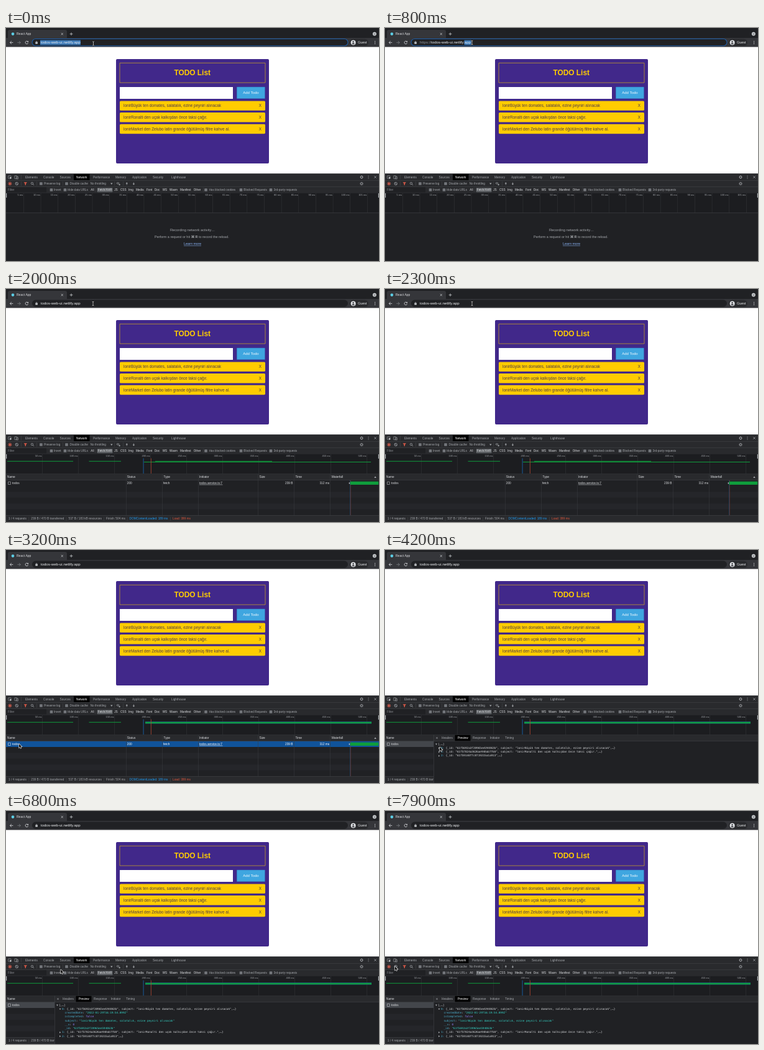
Recreate the animation shown at these times as an HTML page with a canvas. Size 600x375 px, loop 8 s.

```html
<!DOCTYPE html>
<html lang="en">
<head>
<meta charset="utf-8">
<title>Todo app with network panel</title>
<style>
  html, body { margin: 0; width: 100%; height: 100%; overflow: hidden; background: #fff; }
  canvas { display: block; width: 100vw; height: 100vh; }
</style>
</head>
<body>
<canvas id="stage"></canvas>
<script>
const LOOP = 8000, STEP = 100;
const WHOLE_URL = 200, WORD = 600, LOADED = 1700, HOVER = 2900, SELECTED = 3100, PANEL = 3400, EXPANDED = 4700;
const SANS = '"Liberation Sans", Arial, sans-serif';
const MONO = '"DejaVu Sans Mono", monospace';
const GREY = '#a5a8ac', LIGHT = '#dcdee1', BAR = '#292a2d', DARK = '#202124', LINE = '#46484c', GREEN = '#0f9d3c';

const todos = [
  'lonirBüyük ten domates, salatalık, ezine peyniri alınacak',
  'lonirRonalti den uçak kalkışdan önce taksi çağır.',
  'lonirMarket den Zelubo latin grande öğütülmüş filtre kahve al.'
];
const pointerPath = [
  [0, 140.5, 25], [500, 140, 23.5], [2500, 140, 23.5], [3000, 21, 312], [3500, 21, 312],
  [4200, 88, 317], [4700, 88, 317], [5200, 108, 331], [6100, 108, 331],
  [6700, 88, 255], [7000, 88, 255], [7600, 16, 250], [8000, 16, 250]
];

const canvas = document.getElementById('stage');
const c = canvas.getContext('2d');

function rect(x, y, w, h, color, radius = 0) {
  c.fillStyle = color;
  c.beginPath();
  c.roundRect(x, y, w, h, radius);
  c.fill();
}

function frame(x, y, w, h, color, width = 0.6, radius = 0) {
  c.strokeStyle = color;
  c.lineWidth = width;
  c.beginPath();
  c.roundRect(x, y, w, h, radius);
  c.stroke();
}

function path(color, width, ...points) {
  c.strokeStyle = color;
  c.lineWidth = width;
  c.beginPath();
  points.forEach(([x, y]) => c.lineTo(x, y));
  c.stroke();
}

function shape(color, ...points) {
  c.fillStyle = color;
  c.beginPath();
  points.forEach(([x, y]) => c.lineTo(x, y));
  c.fill();
}

function arc(x, y, r, color, width = 0, from = 0, to = Math.PI * 2) {
  c.beginPath();
  c.arc(x, y, r, from, to);
  c.fillStyle = c.strokeStyle = color;
  c.lineWidth = width;
  width ? c.stroke() : c.fill();
}

function text(s, x, y, size = 4.7, color = GREY, { align = 'left', weight = 400, family = SANS } = {}) {
  c.font = `${weight} ${size}px ${family}`;
  c.textAlign = align;
  c.textBaseline = 'middle';
  c.fillStyle = color;
  c.fillText(s, x, y);
  return x + c.measureText(s).width;
}

const hLine = (y, x1 = 0, x2 = 600, color = LINE) => rect(x1, y, x2 - x1, 0.5, color);
const vLine = (x, y1, y2, color = LINE) => rect(x, y1, 0.5, y2 - y1, color);
const cross = (x, y, r, color) => {
  path(color, 0.7, [x - r, y - r], [x + r, y + r]);
  path(color, 0.7, [x - r, y + r], [x + r, y - r]);
};
const dots = (x, y, color) => [-2, 0, 2].forEach(d => arc(x, y + d, 0.55, color));
const checkbox = (x, y) => rect(x - 2.3, y - 2.3, 4.6, 4.6, '#74777c', 0.6);
const gear = (x, y) => {
  arc(x, y, 1.7, GREY, 0.9);
  for (let a = 0; a < 8; a++) {
    const u = Math.cos(a * Math.PI / 4), v = Math.sin(a * Math.PI / 4);
    path(GREY, 0.7, [x + u * 2, y + v * 2], [x + u * 2.8, y + v * 2.8]);
  }
};

function drawAddress(t) {
  const y = 23.4, size = 6.1;
  rect(42, 17.5, 508, 11.2, DARK, 5.6);
  if (t < LOADED) frame(42, 17.5, 508, 11.2, '#1d5da8', 1.1, 5.6);
  rect(47.3, 22.6, 3.6, 3, '#c4c7ca', 0.4);
  arc(49.1, 22.4, 1.1, '#c4c7ca', 0.6, Math.PI, 0);

  const host = 'todos-web-ui.netlify.', end = 'app';
  if (t < WHOLE_URL) rect(55, 19.6, 65, 7.6, '#3b79b8');
  let x = 55.8;
  if (t >= WHOLE_URL && t < LOADED) x = text('https://', x, y, size, '#8d9195');
  x = text(host, x, y, size, '#eceef0');
  if (t >= WORD && t < LOADED) rect(x - 0.3, 19.6, 11.3, 7.6, '#3b79b8');
  text(end, x, y, size, '#eceef0');
}

function drawBrowser(t) {
  rect(0, 0, 600, 31, DARK);
  rect(3, 3, 95, 16, '#35363a', 3);
  rect(0, 16, 600, 14.6, '#35363a');
  arc(11, 9.6, 2.3, '#5ccfe6');
  text('React App', 17, 9.8, 5, LIGHT);
  cross(90.3, 9.6, 1.6, LIGHT);
  path(LIGHT, 0.7, [102.6, 9.6], [107.4, 9.6]);
  path(LIGHT, 0.7, [105, 7.2], [105, 12]);
  arc(592.8, 9.5, 3, '#c4c7ca');
  path(DARK, 0.7, [591.5, 9], [592.8, 10.3], [594.1, 9]);

  path(LIGHT, 0.8, [8.8, 21], [6.4, 23.4], [8.8, 25.8]);
  path(LIGHT, 0.8, [6.4, 23.4], [11.4, 23.4]);
  path('#7c7f83', 0.8, [21, 21], [23.4, 23.4], [21, 25.8]);
  path('#7c7f83', 0.8, [18.4, 23.4], [23.4, 23.4]);
  arc(33.4, 23.4, 2.3, LIGHT, 0.8, 0.3, 5.4);
  shape(LIGHT, [33.8, 22.8], [36, 22.8], [36, 20.4]);
  drawAddress(t);

  rect(553, 17.8, 30, 11, '#292a2d', 5.5);
  arc(558.6, 23.4, 4, '#e0e2e5');
  arc(558.6, 22.3, 1.3, '#44464a');
  arc(558.6, 26.3, 2.2, '#44464a', 0, Math.PI, 0);
  text('Guest', 566, 23.6, 5.4, '#eceef0');
  dots(593.6, 23.4, LIGHT);
}

function drawApp() {
  rect(0, 30.6, 600, 204, '#fff');
  rect(177, 50, 246, 168, '#41288a', 2);
  frame(183, 56.3, 234, 31.7, '#c09a2c', 0.8);
  text('TODO List', 299.7, 72.6, 11.9, '#ffcc00', { align: 'center', weight: 700 });
  rect(183, 95, 182, 19, '#fff');
  rect(371.4, 95, 45, 18.4, '#3fa6e0');
  frame(371.4, 95, 45, 18.4, '#2d7fc0', 0.5);
  text('Add Todo', 393.9, 104.5, 6, '#f4fbff', { align: 'center' });
  todos.forEach((todo, i) => {
    const y = 117.4 + i * 18.7;
    rect(183, y, 234, 15.4, '#ffcc00', 1.6);
    text(todo, 189, y + 8, 6.32, '#4c3a48');
    text('X', 408.8, y + 8, 6.3, '#4c3a48', { align: 'center' });
  });
}

function drawToolbars() {
  rect(0, 234.5, 600, 140.5, DARK);
  rect(0, 234.5, 600, 30.5, BAR);
  hLine(234.5);
  hLine(245);
  hLine(255);
  hLine(265);

  frame(3.5, 237.8, 4.6, 4.4, GREY, 0.6, 0.5);
  shape('#d0d2d5', [5.6, 239.6], [9, 241], [7.2, 243]);
  frame(14, 237.8, 3.6, 4.8, GREY);
  frame(17, 239.3, 2.6, 3.6, GREY);
  vLine(24, 236.5, 243.5);
  rect(109, 235, 25.5, 10, '#000');
  [['Elements', 31], ['Console', 60], ['Sources', 86.5], ['Network', 113], ['Performance', 140], ['Memory', 176],
   ['Application', 203], ['Security', 236], ['Lighthouse', 266]]
    .forEach(([s, x]) => text(s, x, 240.2, 4.75, s === 'Network' ? '#fff' : GREY));
  gear(572, 240);
  dots(583, 240, GREY);
  cross(594, 240, 1.7, GREY);

  arc(6.3, 250.5, 2.5, '#e0604f', 0.7);
  arc(6.3, 250.5, 1.5, '#e0604f');
  arc(17.3, 250.5, 2.2, GREY, 0.8);
  path(GREY, 0.8, [15.7, 248.9], [18.9, 252.1]);
  vLine(24, 247, 254);
  shape('#dc5a48', [28.6, 248.2], [34, 248.2], [32, 250.7], [32, 253], [30.6, 253], [30.6, 250.7]);
  arc(42, 250, 1.7, GREY, 0.7);
  path(GREY, 0.8, [43.2, 251.2], [45, 253]);
  vLine(49.5, 247, 254);
  checkbox(56.4, 250.5);
  text('Preserve log', 61, 250.7);
  vLine(91.5, 247, 254);
  checkbox(97.5, 250.5);
  text('Disable cache', 102.5, 250.7);
  text('No throttling', 135.7, 250.7);
  shape(GREY, [168, 249.6], [171.6, 249.6], [169.8, 252]);
  vLine(174.5, 247, 254);
  [1.2, 2.4, 3.6].forEach(r => arc(180, 252.3, r, GREY, 0.6, -2.4, -0.75));
  arc(182.6, 252.2, 1.1, GREY);
  vLine(188, 247, 254);
  [[194.3, -1], [205.4, 1]].forEach(([x, d]) => {
    path(GREY, 0.8, [x, 250.5 - 2 * d], [x, 250.5 + d]);
    shape(GREY, [x - 1.7, 250.5], [x + 1.7, 250.5], [x, 250.5 + 2.2 * d]);
  });
  gear(572, 250.5);

  rect(0, 256, 65, 8.5, DARK);
  text('Filter', 3, 260.8, 4.7, '#85888c');
  rect(146.5, 257.3, 25, 7, '#5c5f63', 1);
  [['Invert', 77], ['Hide data URLs', 99], ['All', 136.3], ['Fetch/XHR', 147.8], ['JS', 174.2], ['CSS', 184],
   ['Img', 197], ['Media', 209], ['Font', 226], ['Doc', 239], ['WS', 251.7], ['Wasm', 263], ['Manifest', 280],
   ['Other', 301.7], ['Has blocked cookies', 326.5], ['Blocked Requests', 382.3], ['3rd-party requests', 430.5]]
    .forEach(([s, x]) => text(s, x, 260.7, 4.65, x > 135 && x < 310 ? LIGHT : GREY));
  [73, 95, 321.5, 378, 426].forEach(x => checkbox(x, 260.5));
  [143.5, 317].forEach(x => vLine(x, 257, 264));
}

function drawOverview(t) {
  const loaded = t >= LOADED;
  const gap = loaded ? 58 : 27.65, unit = loaded ? 50 : 5;
  rect(0, 265.5, 600, 31.5, '#1c1d20');
  for (let k = 1; k * gap < 600; k++) {
    vLine(k * gap + 0.5, 266, 297, '#36383b');
    text(`${k * unit} ms`, k * gap - 0.4, 269.2, 4, GREY, { align: 'right' });
  }
  hLine(297);
  rect(0, 266, 1.2, 7, '#a9acb0');
  rect(598.8, 266, 1.2, 7, '#a9acb0');
  if (!loaded) return;

  rect(2, 276.7, 106, 1, GREEN);
  rect(133.5, 276.7, 51.5, 1, GREEN);
  if (t < HOVER) {
    rect(222, 277.9, 365, 1, GREEN);
    rect(240, 276.7, 188, 1, GREEN);
  } else {
    rect(224, 276.2, 364, 3.4, '#187b8d');
    rect(224, 277, 364, 1.9, GREEN);
  }
  rect(220.7, 272.5, 0.7, 24.5, '#1877d2');
  rect(233.2, 272.5, 0.7, 24.5, '#b8432d');
}

function drawEmpty() {
  text('Recording network activity…', 300, 325.5, 5.7, GREY, { align: 'center' });
  let x = text('Perform a request or hit ', 239, 336.6, 5.45);
  x = text('⌘ R', x, 336.6, 5.45, GREY, { weight: 700 });
  text(' to record the reload.', x, 336.6, 5.45);
  text('Learn more', 300, 347.4, 5.5, '#8ab4f8', { align: 'center' });
  hLine(350, 286, 314, '#8ab4f8');
}

function drawStatus(right) {
  c.save();
  c.beginPath();
  c.rect(0, 364, right, 11);
  c.clip();
  rect(0, 364.5, 600, 10.5, BAR);
  hLine(364.5);
  [['1 / 4 requests', 4], ['239 B / 470 B transferred', 40.3], ['537 B / 183 kB resources', 100.5],
   ['Finish: 504 ms', 161], ['DOMContentLoaded: 189 ms', 198.5, '#1f9af0'], ['Load: 399 ms', 268, '#e0583e']]
    .forEach(([s, x, color = GREY], i) => {
      if (i) vLine(x - 3.7, 367, 373);
      text(s, x, 370, 4.75, color);
    });
  c.restore();
}

function drawRequests(t) {
  const selected = t >= SELECTED, color = selected ? '#fff' : LIGHT;
  const right = { align: 'right' };
  rect(0, 297.5, 600, 10, BAR);
  for (let y = 317, i = 0; y < 364; y += 9.4, i++) if (i % 2) rect(0, y, 600, 9.4, '#25262a');
  if (selected) rect(0, 307.7, 600, 9.4, '#10539a');
  hLine(307.3);
  [193, 251, 309, 405, 463, 521].forEach(x => vLine(x, 298, 364.5, '#3a3c40'));
  [['Name', 2], ['Status', 194.8], ['Type', 253.5], ['Initiator', 311], ['Size', 407.5], ['Time', 465.5], ['Waterfall', 523.5]]
    .forEach(([s, x]) => text(s, x, 302.8, 4.75, LIGHT));
  shape(GREY, [592.3, 304], [595.7, 304], [594, 301.3]);

  frame(3.5, 310.3, 3.8, 4.2, color, 0.5);
  text('todos', 10, 312.7, 4.75, color);
  text('200', 194.8, 312.7, 4.75, color);
  text('fetch', 253, 312.7, 4.75, color);
  text('todos.service.ts:7', 311, 312.7, 4.75, color);
  hLine(314.8, 311, 348.5, color);
  text('239 B', 461.5, 312.7, 4.75, color, right);
  text('312 ms', 520, 312.7, 4.75, color, right);
  vLine(553, 308, 364, '#275c92');
  vLine(554.5, 308, 364, '#8a3b2c');
  rect(551.7, 311.5, 1.4, 2, '#cfd2d5');
  rect(553.7, 309.8, 45.5, 5.3, GREEN);
  drawStatus(600);
}

function jsonLine(row, x, ...runs) {
  runs.forEach(([s, color]) => { x = text(s, x, 312.6 + row * 6.24, 4.32, color, { family: MONO }); });
}

function triangle(x, row, open) {
  const y = 312.6 + row * 6.24;
  open ? shape(GREY, [x - 1.4, y - 1], [x + 1.4, y - 1], [x, y + 1.3])
       : shape(GREY, [x - 1, y - 1.4], [x - 1, y + 1.4], [x + 1.3, y]);
}

function drawPanel(t) {
  const open = t >= EXPANDED;
  const key = '#4db3d2', string = '#35d4c7', value = '#9980ff';
  rect(0, 297.5, 600, 10, BAR);
  rect(0, 307.7, 78, 9.4, '#43464b');
  for (let y = 326.5; y < 364; y += 18.8) rect(0, y, 78, 9.4, '#25262a');
  hLine(307.3);
  text('Name', 2, 302.8, 4.75, LIGHT);
  frame(3.5, 310.3, 3.8, 4.2, LIGHT, 0.5);
  text('todos', 10, 312.7, 4.75, LIGHT);
  vLine(78, 297.5, 375);

  cross(83.5, 302.5, 1.4, GREY);
  rect(112.5, 297.7, 25, 9.6, '#000');
  [['Headers', 91], ['Preview', 116.8], ['Response', 141], ['Initiator', 168.8], ['Timing', 193]]
    .forEach(([s, x]) => text(s, x, 302.7, 4.75, s === 'Preview' ? '#fff' : GREY));

  const ids = ['61f5692a3f20965ee594063b', '61f57824a3626ae940ab7f60', '61f59140ffc0719215a1a913'];
  triangle(82.5, 0, true);
  jsonLine(0, 85, ['[,…]', LIGHT]);
  ids.forEach((id, i) => {
    const row = i ? i + (open ? 6 : 1) : 1;
    const subject = i < 2 ? `, subject: "${todos[i]}"` : '';
    triangle(87, row, open && !i);
    jsonLine(row, 90, [`${i}: `, key], [`{_id: "${id}"${subject},…}`, LIGHT]);
  });
  if (open) {
    jsonLine(2, 94.5, ['createdDate', key], [': ', LIGHT], ['"2022-01-29T16:19:54.899Z"', string]);
    jsonLine(3, 94.5, ['isCompleted', key], [': ', LIGHT], ['false', value]);
    jsonLine(4, 94.5, ['subject', key], [': ', LIGHT], [`"${todos[0]}"`, string]);
    jsonLine(5, 94.5, ['__v', key], [': ', LIGHT], ['0', value]);
    jsonLine(6, 94.5, ['_id', key], [': ', LIGHT], [`"${ids[0]}"`, string]);
  }
  drawStatus(78);
}

function drawPointer(t) {
  const i = pointerPath.findIndex(([time]) => time > t);
  const [t0, x0, y0] = pointerPath[i - 1], [t1, x1, y1] = pointerPath[i];
  const p = (t - t0) / (t1 - t0), ease = p * p * (3 - 2 * p);
  c.save();
  c.translate(x0 + (x1 - x0) * ease, y0 + (y1 - y0) * ease);
  if (t <= 2500) {
    [['#111', 1.6], ['#f2f2f2', 0.7]].forEach(([color, width]) => {
      path(color, width, [-1.4, -3.3], [0, -2.7], [1.4, -3.3]);
      path(color, width, [0, -2.7], [0, 2.7]);
      path(color, width, [-1.4, 3.3], [0, 2.7], [1.4, 3.3]);
    });
  } else {
    const arrow = [[0, 0], [0, 6.2], [1.4, 4.9], [2.4, 7.1], [3.4, 6.7], [2.5, 4.5], [4.4, 4.4], [0, 0]];
    path('#fff', 1.1, ...arrow);
    shape('#111', ...arrow);
  }
  c.restore();
}

function render(now) {
  const ratio = window.devicePixelRatio || 1;
  const width = Math.round(innerWidth * ratio), height = Math.round(innerHeight * ratio);
  if (canvas.width !== width || canvas.height !== height) Object.assign(canvas, { width, height });
  c.setTransform(width / 600, 0, 0, height / 375, 0, 0);

  const t = Math.floor(now % LOOP / STEP) * STEP;
  drawBrowser(t);
  drawApp();
  drawToolbars();
  drawOverview(t);
  if (t < LOADED) drawEmpty();
  else if (t < PANEL) drawRequests(t);
  else drawPanel(t);
  drawPointer(t);
  requestAnimationFrame(render);
}
requestAnimationFrame(render);
</script>
</body>
</html>
```
